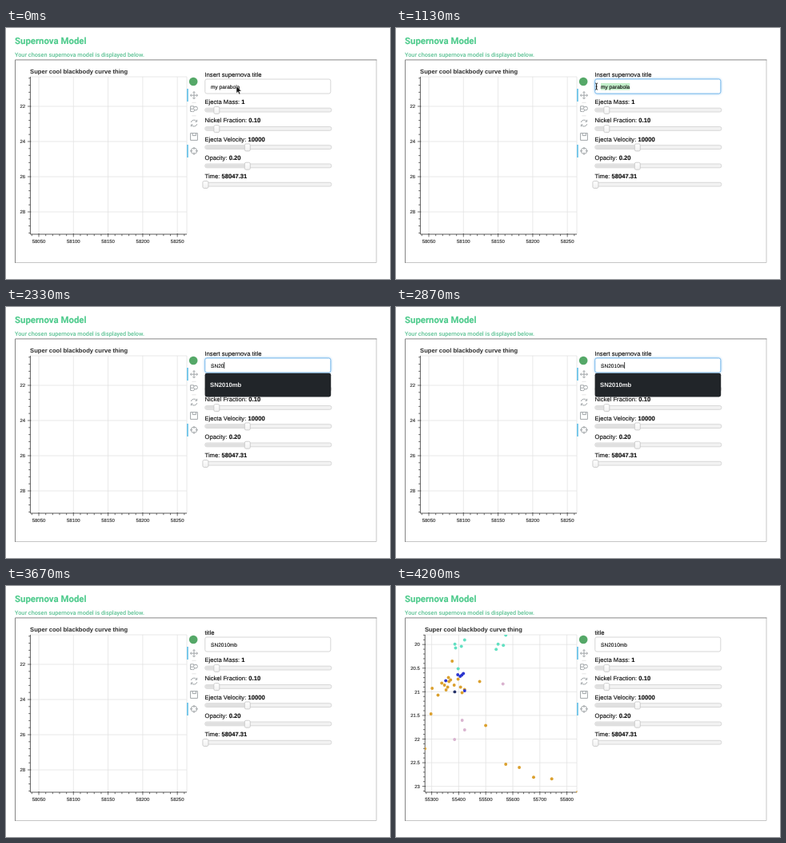
Animation of 480x314 px, one loop 4990 ms. Source, as an HTML page:

```html
<!DOCTYPE html>
<html lang="en">
<head>
<meta charset="utf-8">
<title>Supernova Model</title>
<style>
  html, body { margin: 0; width: 100%; height: 100%; overflow: hidden; background: #fff; }
  svg { display: block; width: 480px; height: 314px; font-family: "Liberation Sans", Arial, sans-serif; text-rendering: geometricPrecision; }
  .head { font-family: Roboto, sans-serif; fill: #4fcb8d; stroke: #4fcb8d; stroke-width: .12; }
  .sub { fill: #5cc294; stroke: none; }
  .label, .entry { fill: #0c0c0c; stroke: #0c0c0c; stroke-width: .12; }
  .label { font-size: 7.65px; }
  .entry { font-size: 6.6px; }
  .bold { font-weight: 700; }
  .title { font-size: 7.6px; font-weight: 700; fill: #2b2b2b; }
  .tick { font-size: 6px; fill: #2b2b2b; stroke: #2b2b2b; stroke-width: .12; }
  .field { fill: #fff; stroke: #ccc; stroke-width: .8; }
  .field.focus { stroke: #66afe9; filter: drop-shadow(0 0 1.6px rgba(102, 175, 233, .75)); }
  .icon { fill: none; stroke: #a1a6a9; stroke-width: 1; }
</style>
</head>
<body>
<svg id="stage" viewBox="0 0 480 314" xmlns="http://www.w3.org/2000/svg">
  <defs>
    <linearGradient id="knob" x2="0" y2="1">
      <stop offset="0" stop-color="#fff"/><stop offset="1" stop-color="#f1f1f1"/>
    </linearGradient>
    <clipPath id="plotClip"><rect x="36.2" y="61" width="190.3" height="197.3"/></clipPath>
  </defs>

  <text class="head bold" x="11" y="19.7" font-size="11.4">Supernova Model</text>
  <text class="head sub" x="11" y="36.4" font-size="7.3" font-weight="500">Your chosen supernova model is displayed below.</text>
  <path d="M463 39.9V293.5H11.5" fill="none" stroke="#c6c6c6"/>
  <path d="M11.5 294V39.9H463.5" fill="none" stroke="#868686"/>

  <g id="before"></g>
  <g id="after"></g>

  <!-- toolbar -->
  <circle cx="234.2" cy="67" r="5.3" fill="#55a868"/>
  <path d="M227 76V92M227 146V162" stroke="#26aae1" stroke-width="1.2"/>
  <path d="M232.5 93.3h5M232.5 109.8h5" stroke="#ddd" stroke-width=".8"/>
  <g class="icon">
    <path d="M230.5 84.2h9M235 79.7v9M232 82.7l-1.6 1.5 1.6 1.5M238 82.7l1.6 1.5-1.6 1.5M233.5 81.2l1.5-1.6 1.5 1.6M233.5 87.2l1.5 1.6 1.5-1.6"/>
    <path d="M234.6 99.2v-1.4h-4v6.6h3M231 101.2h3.2"/>
    <circle cx="237" cy="100.6" r="2.4"/><path d="M235.8 102.6l-1.6 2.6"/>
    <path d="M231.3 118a3.9 3.9 0 0 1 7-1.2M238.8 120.2a3.9 3.9 0 0 1-7 1.2M238.7 114.8v2.4h-2.3M231.4 123.4V121h2.3"/>
    <path d="M230.6 131.6h8.8v8.8h-8.8zM233.2 131.6v3h4.2v-3"/>
    <circle cx="235" cy="153.8" r="3.7"/><path d="M235 148.9v3.2M235 155.5v3.2M230.1 153.8h3.2M236.7 153.8h3.2"/>
  </g>

  <!-- controls -->
  <text id="caption" class="label" x="248.5" y="60.8"></text>
  <g id="sliders"></g>
  <rect id="field" class="field" x="248.8" y="64" width="157" height="18" rx="2.2"/>
  <rect id="selection" y="69" height="8.6" fill="#c3efcb"/>
  <text id="entry" class="entry" x="256" y="75.5"></text>
  <path id="caret" d="M0 69v8" stroke="#111" stroke-width=".8"/>
  <g id="menu">
    <rect x="248.6" y="82.8" width="157.6" height="29.6" rx="2.4" fill="#212529"/>
    <text class="bold" x="255" y="100.4" font-size="7.7" fill="#f1f1f1">SN2010mb</text>
  </g>
  <path id="arrow" d="M288 72.6v9l2-1.9 1.4 3.2 1.5-.7-1.4-3.1h2.8z" fill="#111" stroke="#fff" stroke-width=".5"/>
  <path id="beam" d="M-1.6 69q1.6 0 1.6 1.2V76q0 1.2-1.6 1.2M1.6 69Q0 69 0 70.2V76q0 1.2 1.6 1.2M-.9 73.3h1.8" fill="none" stroke="#111" stroke-width=".8"/>
</svg>
<script>
const LOOP = 4990;
const FOCUS = 530, TYPE = 1600, MENU_OFF = 2930, CARET_OFF = 3470, COMMIT = 3670, PLOT = 3800;
const $ = id => document.getElementById(id);

function add(parent, tag, attrs, text) {
  const el = document.createElementNS("http://www.w3.org/2000/svg", tag);
  for (const k in attrs) el.setAttribute(k, attrs[k]);
  if (text !== undefined) el.textContent = text;
  parent.append(el);
  return el;
}

const TOP = 61, BOTTOM = 258, RIGHT = 226;

// axis: { at: first major position, gap, from: first value, step, n }
function drawPlot(g, left, x, y) {
  const line = (d, stroke, width) => add(g, "path", { d, stroke, "stroke-width": width, fill: "none" });
  const tickPath = (axis, lo, hi, mark) => {
    let d = "";
    for (let i = -5; i < axis.n * 5 + 5; i++) {
      const p = axis.at + i * axis.gap / 5;
      if (p >= lo && p <= hi) d += mark(p, i % 5 === 0);
    }
    return d;
  };
  let grid = `M${left} ${TOP}H${RIGHT}V${BOTTOM}`;
  for (let i = 0; i < x.n; i++) grid += `M${x.at + i * x.gap} ${TOP}V${BOTTOM}`;
  for (let i = 0; i < y.n; i++) grid += `M${left} ${y.at + i * y.gap}H${RIGHT}`;
  line(grid, "#e3e3e3", .8);
  line(`M${left} ${TOP}V${BOTTOM}H${RIGHT}`, "#333", .8);
  line(tickPath(x, left, RIGHT, (p, big) => big ? `M${p} ${BOTTOM - 1}v4.4` : `M${p} ${BOTTOM}v2.2`), "#333", .7);
  line(tickPath(y, TOP, BOTTOM, (p, big) => big ? `M${left + 1} ${p}h-4.4` : `M${left} ${p}h-2.2`), "#333", .7);
  for (let i = 0; i < x.n; i++)
    add(g, "text", { class: "tick", x: x.at + i * x.gap, y: 269.4, "text-anchor": "middle" }, x.from + i * x.step);
  for (let i = 0; i < y.n; i++)
    add(g, "text", { class: "tick", x: left - 6.3, y: y.at + i * y.gap + 2.2, "text-anchor": "end" }, y.from + i * y.step);
  add(g, "text", { class: "title", x: left - .3, y: 57.4 }, "Super cool blackbody curve thing");
}

drawPlot($("before"), 30.4,
  { at: 41, gap: 43.3, from: 58050, step: 50, n: 5 },
  { at: 98, gap: 44, from: 22, step: 2, n: 4 });
drawPlot($("after"), 36.2,
  { at: 44.6, gap: 33.8, from: 55300, step: 100, n: 6 },
  { at: 73.2, gap: 29.57, from: 20, step: .5, n: 7 });

const points = {
  "#dba02e": "36,203.5 43.7,160 45.2,128 52.5,136.5 57.2,121.5 60.6,124 62.6,130 64.6,126.5 65.6,114.5 66.2,119.5 68.2,117.5 70.2,94 72.7,124 77.6,116.5 82.6,133.5 85.7,129.5 80.7,126.5 104.6,119.5 112.1,174.5 137.2,223 154.1,227 172,239.2 194.7,241.3 227,258",
  "#d9b3cf": "82.7,168 85.8,180 73.2,192 133.7,122.5",
  "#62e0c2": "73.6,72.8 74.5,77.5 81.7,75.5 85.8,67.5 77.7,103.5 125.2,79.3 127.6,72.7 134.2,74.3 137.2,61.5",
  "#2b35cf": "62.2,118.5 77.2,111 80.2,113 82.2,111.5 84.2,109.5 85.8,131",
  "#27346b": "73.4,132.4"
};
const dots = add($("after"), "g", { "clip-path": "url(#plotClip)" });
for (const fill in points)
  for (const p of points[fill].split(" ")) {
    const [cx, cy] = p.split(",");
    add(dots, "circle", { cx, cy, r: 1.95, fill });
  }

[["Ejecta Mass: ", "1", 263.3], ["Nickel Fraction: ", "0.10", 263.3], ["Ejecta Velocity: ", "10000", 301.8],
 ["Opacity: ", "0.20", 301.8], ["Time: ", "58047.31", 249.4]].forEach(([name, value, knob], i) => {
  const g = $("sliders"), y = 102.6 + i * 23.27;
  const label = add(g, "text", { class: "label", x: 248.5, y: y - 7.6 }, name);
  label.style.whiteSpace = "pre";
  add(label, "tspan", { class: "bold" }, value);
  add(g, "rect", { x: 248.8, y: y - 2.4, width: 158, height: 4.8, rx: 2, fill: "#f2f2f2", stroke: "#d0d0d0", "stroke-width": .8 });
  add(g, "rect", { x: 249.2, y: y - 2, width: Math.max(0, knob - 249.2), height: 4, rx: 1.6, fill: "#e0e0e0" });
  add(g, "rect", { x: knob - 3.5, y: y - 4.2, width: 7, height: 9, rx: 1.8, fill: "url(#knob)", stroke: "#c4c4c4", "stroke-width": .8 });
});

// [start time, value] steps
const beamSteps = [[0, 0], [130, 293], [200, 298.5], [270, 301.8], [600, 299], [670, 293], [730, 284],
  [800, 274], [870, 264], [930, 256], [1000, 250.6], [TYPE, 0]];
const textSteps = [[0, "my parabola"], [TYPE, "s"], [1730, "SN"], [2200, "SN2"], [2270, "SN20"],
  [2400, "SN201"], [2470, "SN2010"], [2870, "SN2010m"], [MENU_OFF, "SN2010mb"]];
const at = (steps, t) => steps.findLast(s => s[0] <= t)[1];
const show = (id, on) => { $(id).style.display = on ? "" : "none"; };

function draw(t) {
  const beam = at(beamSteps, t);
  show("arrow", t < 130);
  show("beam", beam > 0);
  $("beam").setAttribute("transform", `translate(${beam} 0)`);

  const text = at(textSteps, t), entry = $("entry");
  if (entry.textContent !== text) entry.textContent = text;
  const end = 256 + entry.getComputedTextLength();
  const focused = t >= FOCUS && t < COMMIT;
  $("field").classList.toggle("focus", focused);

  const selStart = Math.max(256, Math.min(end, beam));
  const selecting = focused && t < TYPE && selStart < end - .5;
  show("selection", selecting);
  $("selection").setAttribute("x", selStart);
  $("selection").setAttribute("width", Math.max(0, end - selStart));
  show("caret", focused && !selecting && t < CARET_OFF);
  $("caret").setAttribute("transform", `translate(${end + .3} 0)`);

  show("menu", t >= TYPE && t < MENU_OFF);
  $("caption").textContent = t < COMMIT ? "Insert supernova title" : "title";
  show("before", t < PLOT);
  show("after", t >= PLOT);
}

const start = performance.now();
function tick() {
  draw((performance.now() - start) % LOOP);
  requestAnimationFrame(tick);
}
tick();
</script>
</body>
</html>
```
